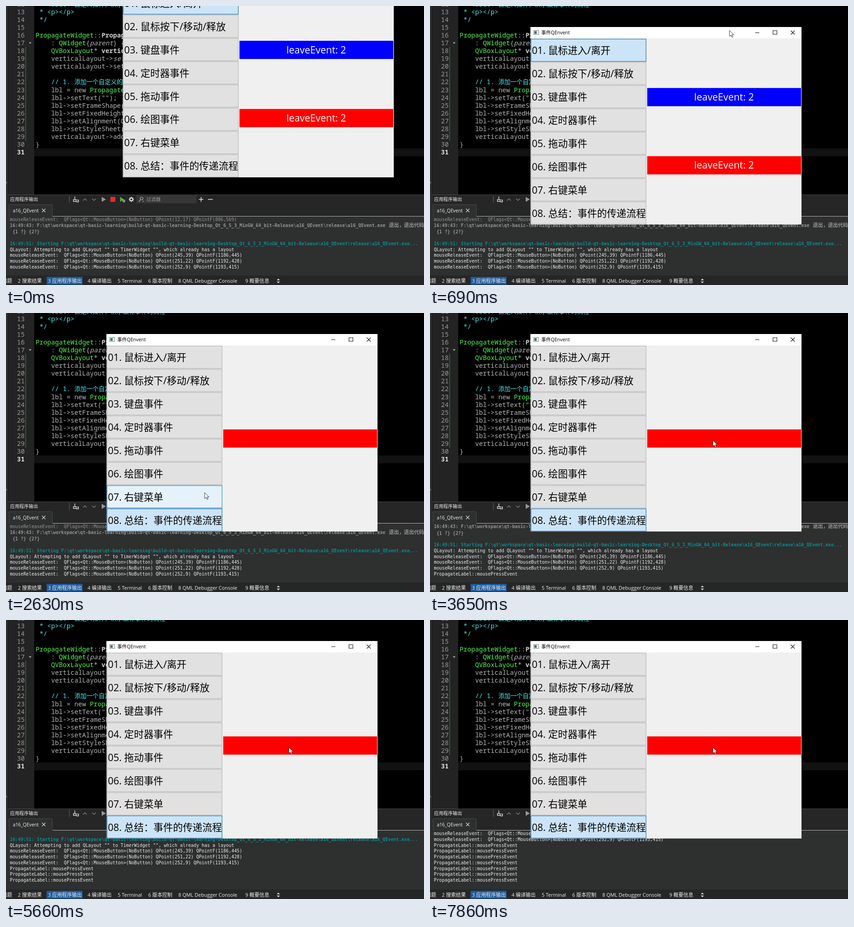
An HTML page that plays this animation: 917x611 px, repeating every 8000 ms.

```html
<!DOCTYPE html>
<html lang="zh">
<head>
<meta charset="utf-8">
<title>QEvent</title>
<style>
html, body { margin: 0; width: 100%; height: 100%; overflow: hidden; background: #000; }
#stage { position: absolute; left: 0; top: 0; display: block; isolation: isolate; }
text { white-space: pre; }
.ui { font-family: "Open Sans", "Noto Sans CJK SC", "Noto Sans CJK", sans-serif; }
.mono { font-family: "Noto Sans Mono", "Noto Sans CJK SC", "Noto Sans CJK", monospace; }
.log { font-family: "DejaVu Sans Mono", "Noto Sans CJK SC", "Noto Sans CJK", monospace; }
.b { font-weight: 700; }
.i { font-style: italic; }
#drag { mix-blend-mode: difference; }
</style>
</head>
<body>
<svg id="stage" width="917" height="611" viewBox="0 0 917 611"></svg>
<script>
const LOOP = 8000;
const stage = document.getElementById('stage');
const esc = s => s.replace(/&/g, '&amp;').replace(/</g, '&lt;');
const rect = (x, y, w, h, fill, more = '') =>
  `<rect x="${x}" y="${y}" width="${w}" height="${h}" fill="${fill}" ${more}/>`;
const path = (d, stroke, width = 1.2, fill = 'none') =>
  `<path d="${d}" stroke="${stroke}" stroke-width="${width}" fill="${fill}"/>`;
// Text whose line is centred on cy
const raw = (x, cy, inner, size, fill, cls, more = '') =>
  `<text x="${x}" y="${cy + size * 0.35}" font-size="${size}" fill="${fill}" class="${cls}" ${more}>${inner}</text>`;
const label = (x, cy, s, size, fill, cls = 'ui', more = '') => raw(x, cy, esc(s), size, fill, cls, more);

// ---- Code editor ----
const GREEN = '#55f555', CYAN = '#4fe9ea', PLAIN = '#b4b4b4';
const code = {
  12: [[' * \\brief ', CYAN], ['自定义控件，演示鼠标事件的流程', CYAN, 'cjk']],
  13: [[' * <p></p>', CYAN]],
  14: [[' */', CYAN]],
  16: [['PropagateWidget', GREEN], ['::', PLAIN], ['Propagate', '#d0d0d0', 'b']],
  17: [['    : ', PLAIN], ['QWidget', GREEN], ['{', PLAIN], ['parent', PLAIN, 'i'], ['} {', PLAIN]],
  18: [['    QVBoxLayout', GREEN], ['* ', PLAIN], ['vertical', '#d0d0d0', 'b']],
  19: [['    verticalLayout->', PLAIN], ['set', PLAIN, 'i']],
  20: [['    verticalLayout->set', PLAIN]],
  22: [['    // 1. ', CYAN], ['添加一个自定义的', CYAN, 'cjk']],
  23: [['    lbl = new ', PLAIN], ['PropagateL', GREEN]],
  24: [['    lbl->setText("");', PLAIN]],
  25: [['    lbl->setFrameShape(', PLAIN]],
  26: [['    lbl->setFixedHeight', PLAIN]],
  27: [['    lbl->setAlignment(Q', PLAIN]],
  28: [['    lbl->setStyleSheet(', PLAIN]],
  29: [['    verticalLayout->add', PLAIN]],
  30: [['}', PLAIN]]
};
const span = ([s, fill, cls = '']) =>
  `<tspan fill="${fill}" class="${cls}"${cls === 'cjk' ? ' font-size="13.3"' : ''}>${esc(s)}</tspan>`;

function editor() {
  let out = rect(0, 0, 62, 413, '#232323') + rect(0, 0, 4, 611, '#2e2f2f') + rect(4, 0, 1, 413, '#151515')
    + rect(62, 312, 855, 17, '#121212') + rect(42.5, 89, 1.5, 206, '#1c7a2a')
    + path('M50 79.5h6l-3 3.5z', 'none', 0, '#b0b0b0') + path('M0 385l2 2-2 2', '#999', 1);
  for (let n = 12; n <= 31; n++) {
    const y = 13.5 + (n - 13) * 17 + (n > 22 ? 1 : 0);
    const last = n === 31;
    out += label(41, y, String(n), 14.17, last ? '#e0e0e0' : '#999', last ? 'mono b' : 'mono', 'text-anchor="end"');
    if (code[n]) out += raw(65, y, code[n].map(span).join(''), 14.17, PLAIN, 'mono');
  }
  return out;
}

// ---- Output pane ----
function pane() {
  const tabs = [[-8.5, '问题'], [26, '2 搜索结果'], [92, '3 应用程序输出'], [179, '4 编译输出'], [245, '5 Terminal'],
    [312, '6 版本控制'], [378, '8 QML Debugger Console'], [525, '9 概要信息']];
  const gear = Array.from({ length: 8 }, (_, k) => rect(274, 418, 2, 2.5, '#ddd', `transform="rotate(${k * 45} 275 423.5)"`)).join('');
  return rect(4, 413, 913, 198, '#262626') + rect(4, 413, 913, 1, '#4a4a4a')
    + label(9, 423, '应用程序输出', 10.2, '#f0f0f0')
    + rect(138.5, 416, 1, 15, '#666')
    + path('M151 417v6M148 424h6v4h-6zM154 429h5v-4h-3', '#ddd', 1.4)
    + path('M169 426l4-4 4 4', '#8a8a8a') + path('M189 422l4 4 4-4', '#8a8a8a')
    + path('M210 418v11l9-5.5z', 'none', 0, '#999')
    + rect(229, 418, 11, 11, '#f0252c')
    + path('M250.5 418v11l8-5.5z', 'none', 0, '#3fc33f') + path('M256.5 425h4v4h-4z', '#ddd', 1, '#555')
    + gear + '<circle cx="275" cy="423.5" r="3" fill="none" stroke="#ddd" stroke-width="2"/>'
    + rect(286, 415, 132, 17, '#363636')
    + '<circle cx="297.5" cy="421.5" r="3" fill="none" stroke="#aaa" stroke-width="1.2"/>'
    + path('M295.5 424l-4 4.5', '#aaa', 1.4) + path('M299 427h4l-2 2z', 'none', 0, '#aaa')
    + label(308, 423, '过滤器', 10.4, '#9a9a9a')
    + path('M423 423.5h10M428 418.5v10M443 423.5h10.5', '#e6e6e6', 1.6)
    + rect(4, 461, 913, 129, '#2e2f2f')
    + rect(6, 435, 95, 27, '#2e2f2f') + path('M6.5 461v-26h95v25.5H917', '#4b4b4b', 1)
    + rect(102, 460, 815, 1, '#b5b5b5')
    + label(15, 448, 'a16_QEvent', 10.3, '#f0f0f0') + path('M79 444l7.5 7.5M86.5 444l-7.5 7.5', '#e0e0e0', 1.1)
    + '<svg x="0" y="462" width="917" height="128" viewBox="0 462 917 128"><g id="log"></g></svg>'
    + rect(0, 590, 917, 21, '#262626') + rect(89, 593, 79, 17, '#1d5a9c')
    + tabs.map(([x, s]) => label(x, 602, s, 10.9, '#f0f0f0')).join('')
    + path('M594 600.5h7l-3.5-3.5zM594 603.5h7l-3.5 3.5z', 'none', 0, '#ddd');
}

const DIM = '#949494', TEAL = '#0c8b8b', LIT = '#ececec';
const exe = 'F:\\qt\\workspace\\qt-basic-learning\\build-qt-basic-learning-Desktop_Qt_6_5_3_MinGW_64_bit-Release\\a16_QEvent\\release\\a16_QEvent.exe';
const release = (a, b) => `mouseReleaseEvent:  QFlags<Qt::MouseButton>(NoButton) QPoint(${a}) QPointF(${b})`;
const baseLog = [
  [release('12,17', '886,569'), DIM],
  ['16:49:43: ' + exe, DIM, 'b', '退出，退出代码'],
  [' {1 ?} {2?}', DIM, 'b'],
  ['', DIM],
  ['16:49:51: Starting ' + exe + '...', TEAL, 'b'],
  ['QLayout: Attempting to add QLayout "" to TimerWidget "", which already has a layout', LIT],
  [release('245,39', '1186,445'), LIT],
  [release('251,22', '1192,428'), LIT],
  [release('252,9', '1193,415'), LIT]
];
function log(presses) {
  const lines = baseLog.concat(Array.from({ length: presses }, () => ['PropagateLabel::mousePressEvent', LIT]));
  const bottom = presses < 2 ? 571.3 : 569.6;
  return lines.map(([s, fill, cls = '', tail], i) => {
    const y = bottom - 12.73 * (lines.length - 1 - i) - (i < 2 ? 2 : 0);
    if (y < 455) return '';
    return label(8.5, y, s, 9.85, fill, 'log ' + cls) + (tail ? label(840, y, tail, 11, fill, 'ui b') : '');
  }).join('');
}

// ---- Floating window, drawn at its resting place ----
const PITCH = 50.93;
const names = ['鼠标进入/离开', '鼠标按下/移动/释放', '键盘事件', '定时器事件', '拖动事件', '绘图事件', '右键菜单', '总结：事件的传递流程'];
const bar = (y, fill, s) => rect(476, y, 338.5, 41, fill, 'stroke="#fff"')
  + label(645, y + 20.5, s, 21.4, '#fff', 'ui', 'text-anchor="middle"');

function win() {
  return rect(220.5, 46, 594.5, 432.5, '#f0f0f0') + rect(220.5, 46, 594.5, 25, '#fff')
    + rect(227.5, 53.5, 11, 9, '#eee', 'stroke="#888"') + rect(229, 55, 5, 6, '#3c7a78')
    + label(244, 58, '事件QEnvent', 10.5, '#000')
    + path('M713.5 58.5h9M752.5 54h8.5v8h-8.5zM791.5 54l8.5 8.5M800 54l-8.5 8.5', '#111', 1.1)
    + names.map((s, i) => {
      const y = 72.3 + i * PITCH;
      return rect(221.5, y, 252.5, 49, '#e1e1e1', `id="btn${i}" stroke="#adadad"`)
        + label(223.5, y + 25.3, `0${i + 1}. ${s}`, 21.45, '#000');
    }).join('')
    + `<g id="pair">${bar(179, '#00f', 'leaveEvent: 2')}${bar(328.3, '#f00', 'leaveEvent: 2')}</g>`
    + `<g id="single">${bar(254.3, '#f00', '')}</g>`;
}

stage.innerHTML = rect(0, 0, 917, 611, '#000') + editor() + pane()
  + `<g id="win">${win()}</g>`
  + '<rect id="drag" x="1.5" y="1.5" width="592.5" height="430.5" fill="none" stroke="#fff" stroke-width="3"/>'
  + '<g id="cursor"><circle id="halo" cx="-0.5" cy="1" r="10.5" fill="#cdb90a" fill-opacity="0.55"/>'
  + path('M.5.5V13.5L3.6 10.7 5.9 15.6 8 14.6 5.8 10H10z', '#222', 0.9, '#fff') + '</g>';
const el = {};
stage.querySelectorAll('[id]').forEach(n => { el[n.id] = n; });

// ---- Timeline ----
// time, outline x, y while the window is dragged
const dragSteps = [[70, 252, -42], [140, 240, -12], [210, 229, 14], [280, 220, 33], [350, 211, 43],
  [420, 206, 50], [490, 209, 52], [560, 216, 48], [620, 220, 45]];
const DROP = 690, SWITCH = 2070;
const selectPress = 1740;
const presses = [[3520, 3650], [4660, 4790], [5520, 5660], [6600, 6730], [7060, 7130], [7460, 7530], [7730, 7860]];
const A = [617, 85], B = [356, 442], C = [620, 278.5];

const ease = p => p * p * (3 - 2 * p);
function glide(t, start, steps, from, to) {
  const p = ease(Math.min(1, Math.max(0, Math.floor((t - start) / 70) / steps)));
  return from.map((v, k) => v + (to[k] - v) * p);
}
function pointer(t, frame) {
  if (t < DROP) return frame ? [frame[1] + 436.5, frame[2] + 7.5] : [693, -50];
  if (t < 760) return [656.5, 53];
  if (t < 830) return [640, 67];
  return t < 2350 ? glide(t, 830, 12, A, B) : glide(t, 2350, 11, B, C);
}
const show = (node, on) => node.setAttribute('visibility', on ? 'visible' : 'hidden');
const move = (node, x, y) => node.setAttribute('transform', `translate(${x} ${y})`);

let shownPresses = -1;
function render(t) {
  const frame = t < DROP ? dragSteps.filter(s => s[0] <= t).pop() : null;
  const [cx, cy] = pointer(t, frame);
  const pressed = t >= selectPress && t < SWITCH;
  const switched = t >= SWITCH;

  move(el.win, t < DROP ? 35.7 : 0, t < DROP ? -103.3 : 0);
  show(el.drag, frame);
  if (frame) move(el.drag, frame[1], frame[2]);
  move(el.cursor, cx, cy);
  show(el.halo, frame || pressed || presses.some(([a, b]) => t >= a && t < b));
  show(el.pair, !switched);
  show(el.single, switched);

  const hover = t >= DROP && cx > 221 && cx < 474 ? Math.floor((cy - 72) / PITCH) : -1;
  names.forEach((_, i) => {
    const on = i === (switched ? 7 : 0) || (pressed && i === 7);
    const look = on ? ['#cce4f7', '#005a9e'] : i === hover ? ['#e5f1fb', '#0078d7'] : ['#e1e1e1', '#adadad'];
    el['btn' + i].setAttribute('fill', look[0]);
    el['btn' + i].setAttribute('stroke', look[1]);
  });

  const count = presses.filter(p => p[0] <= t).length;
  if (count !== shownPresses) {
    el.log.innerHTML = log(count);
    shownPresses = count;
  }
}

const origin = performance.now();
function tick() {
  render((performance.now() - origin) % LOOP);
  requestAnimationFrame(tick);
}
render(0);
requestAnimationFrame(tick);
</script>
</body>
</html>
```
